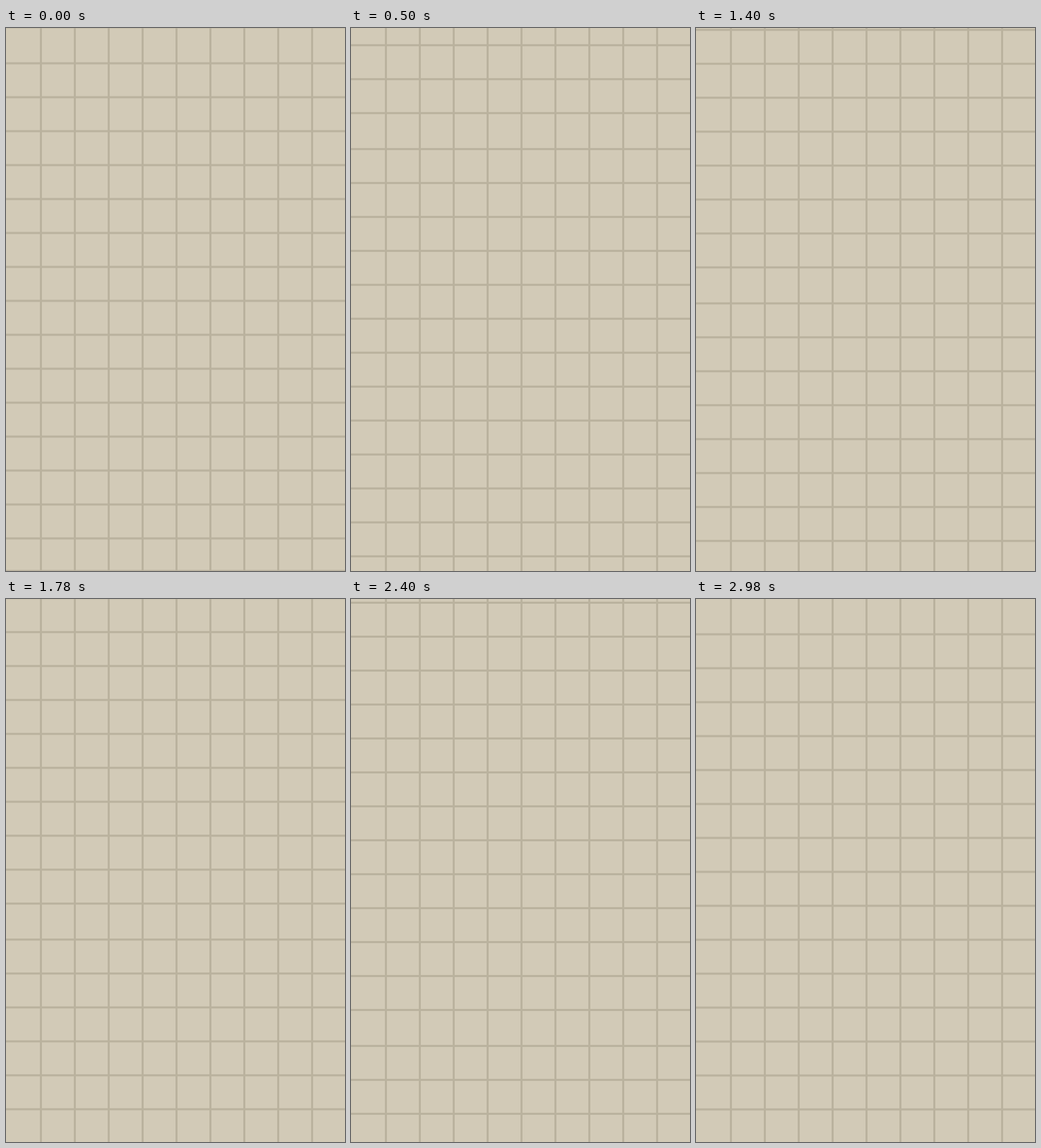
An HTML page with a canvas for the animation above (3 s loop, 500 by 800 pixels).

```html
<!DOCTYPE html>
<html lang="en">
<head>
<meta charset="utf-8">
<title>Scrolling grid</title>
<style>
  html, body { margin: 0; width: 100%; height: 100%; overflow: hidden; background: #d2cab7; }
  canvas { display: block; }
</style>
</head>
<body>
<canvas id="stage" width="500" height="800"></canvas>
<script>
const ctx = document.getElementById('stage').getContext('2d');
const W = 500, H = 800, CELL = 50, LINE = 3;
const FIRST_ROW = 52, ROWS = 15, SHIFT = 753;
const STEP = 20, STEPS = 150;

const row = y => ctx.fillRect(0, y - LINE / 2, W, LINE);

function draw(time) {
  const step = Math.floor(time / STEP) % STEPS;
  const offset = SHIFT * step / (STEPS - 1);

  ctx.fillStyle = '#d2cab7';
  ctx.fillRect(0, 0, W, H);
  ctx.fillStyle = '#bab29e';
  for (let x = CELL; x < W; x += CELL) ctx.fillRect(x, 0, LINE, H);

  // Two stacked sheets slide down; the lower one ends with an edge line.
  for (const top of [offset - SHIFT, offset]) {
    for (let i = 0; i < ROWS; i++) row(top + FIRST_ROW + i * CELL);
  }
  row(offset + H);
}

const start = performance.now();
function tick() {
  draw(performance.now() - start);
  requestAnimationFrame(tick);
}
tick();
</script>
</body>
</html>
```
